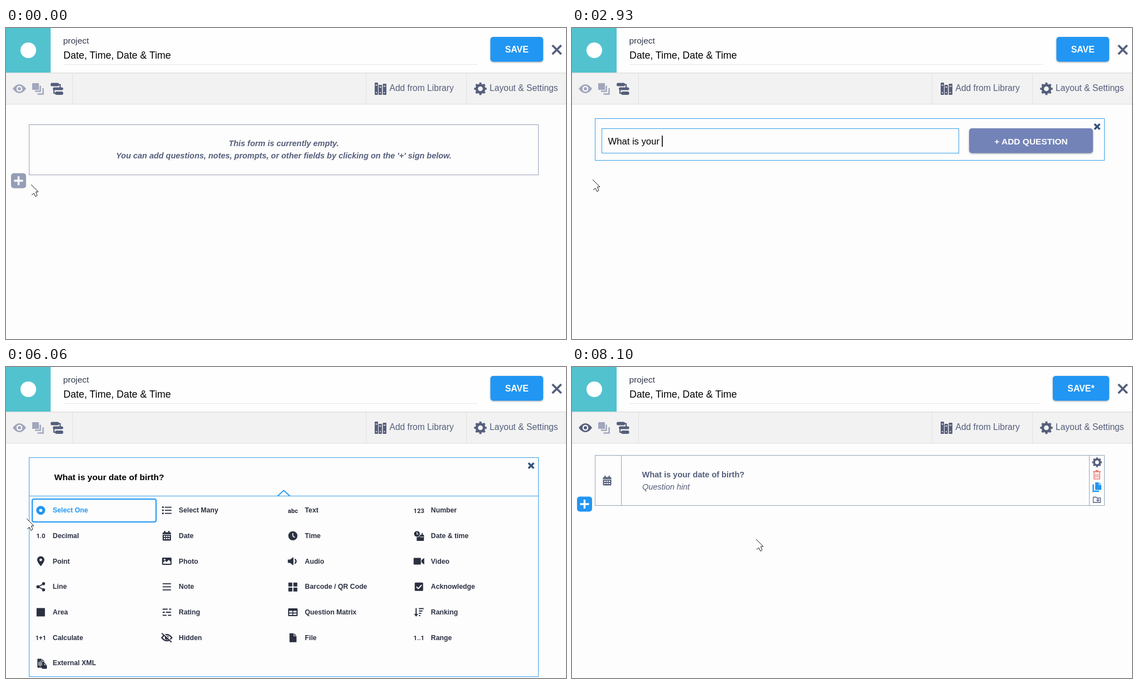
Recreate the animation shown at these times as an HTML page. Size 1004 by 558 pixels, loop 9.55 s.

```html
<!DOCTYPE html>
<html lang="en">
<head>
<meta charset="utf-8">
<title>Form builder</title>
<style>
  html, body { margin: 0; width: 100%; height: 100%; overflow: hidden; background: #fdfdfd; }
  svg { display: block; font-family: "Liberation Sans", Arial, sans-serif; }
  text { white-space: pre; }
  .navy { color: #555e7b; }
  .pale { color: #a1a6bb; }
  .blue { color: #2196f3; }
  .ink { color: #2b3040; }
  .icon, .label { fill: currentColor; }
  .line { fill: none; stroke: currentColor; }
  .hole { fill: #fdfdfd; }
  .cut { fill: none; stroke: #fdfdfd; }
  .bold { font-weight: bold; }
  .italic { font-style: italic; }
  .glyph { font: 700 11.3px Roboto, sans-serif; text-anchor: middle; }
  .raised { filter: drop-shadow(0 1px 1.5px #0005); }
</style>
</head>
<body>
<svg id="stage" width="1004" height="558" viewBox="0 0 1004 558"></svg>
<script>
const LOOP = 9550;
const QUESTION = "What is your date of birth?";
// One time per typed character.
const KEY_TIMES = [1080, 1280, 1380, 1480, 1610, 1810, 1910, 2010, 2410, 2540, 2670, 2800, 2930,
  3320, 3520, 3610, 3690, 3780, 3980, 4110, 4310, 4440, 4640, 4710, 4910, 5110, 5790];
const CARET_OFF = [[950, 1080], [5590, 5790]];

const at = (x, y, body, cls = "") => `<g transform="translate(${x} ${y})" class="${cls}">${body}</g>`;
const path = (d, cls = "icon", width = 1) => `<path d="${d}" class="${cls}" stroke-width="${width}"/>`;
const line = (d, width) => path(d, "line", width);
const cut = (d, width) => path(d, "cut", width);
const disc = (x, y, r, cls = "icon") => `<circle cx="${x}" cy="${y}" r="${r}" class="${cls}"/>`;
const box = (x, y, w, h, r = 0, cls = "icon") =>
  `<rect x="${x}" y="${y}" width="${w}" height="${h}" rx="${r}" class="${cls}"/>`;
const frame = (x, y, w, h, color, fill = "#fdfdfd") =>
  `<rect x="${x}" y="${y}" width="${w}" height="${h}" fill="${fill}" stroke="${color}"/>`;
const text = (x, y, size, words, cls = "", more = "") =>
  `<text x="${x}" y="${y}" font-size="${size}" class="label ${cls}" ${more}>${words}</text>`;
const centered = 'text-anchor="middle"';
const glyph = words => `<text y="4.5" class="icon glyph">${words}</text>`;
const cross = r => `M${-r} ${-r}L${r} ${r}M${r} ${-r}L${-r} ${r}`;

const gear = r => `<circle r="${r * .6}" class="line" stroke-width="${r * .42}"/>
  <circle r="${r * .87}" class="line" stroke-width="${r * .26}" pathLength="16"
    stroke-dasharray="1 1" stroke-dashoffset=".5"/>`;
const eye = path("M-12 0Q-6 -8 0 -8T12 0Q6 8 0 8T-12 0Z") + disc(0, 0, 5.2, "hole") + disc(0, 0, 3);
const plus = box(0, 0, 27, 27, 5) + cut("M5.5 13.5h16M13.5 5.5v16", 3.4);
const calendar = box(-7.5, -6.5, 15, 15, 1.5) + line("M-3.7 -9v4M3.7 -9v4", 2.2) +
  cut("M-7.5 -2.4h15", 1) + cut("M-5.3 1h2.6M-1.3 1h2.6M2.7 1h2.6M-5.3 5h2.6M-1.3 5h2.6M2.7 5h2.6", 2.2);
const sheet = path("M-6 -8H2L6.5 -3.5V8H-6Z") + cut("M1.8 -8V-3.3H6.5", 1);

const TYPES = [
  ["Select One", disc(0, 0, 8) + disc(0, 0, 2.8, "hole")],
  ["Select Many", line("M-8.5 -5.5h3M-8.5 0h3M-8.5 5.5h3", 2.8) + line("M-3.5 -5.5h12M-3.5 0h12M-3.5 5.5h12", 1.8)],
  ["Text", glyph("abc")],
  ["Number", glyph("123")],
  ["Decimal", glyph("1.0")],
  ["Date", calendar],
  ["Time", disc(0, 0, 8.2) + cut("M0 -5V.5L3.5 3", 1.6)],
  ["Date &amp; time", box(-4, -2, 13, 11, 1) + line("M6 -5v4", 2) + disc(-3.5, -3.5, 6.2, "hole") +
    disc(-3.5, -3.5, 5.2) + cut("M-3.5 -7v4h2.6", 1.2) + cut("M2 2h6", 1)],
  ["Point", path("M0 9Q-6.5 1 -6.5 -2.5A6.5 6.5 0 0 1 6.5 -2.5Q6.5 1 0 9Z") + disc(0, -2.5, 2.4, "hole")],
  ["Photo", box(-8.5, -6.5, 17, 13, 1.5) + path("M-6.5 4.5V2L-3 -1L-.5 1.5L3.5 -2.5L6.5 .5V4.5Z", "hole") +
    disc(-4, -3, 1.5, "hole")],
  ["Audio", path("M-9 -3H-5L1 -7.5V7.5L-5 3H-9Z") + line("M3.5 -4Q8 0 3.5 4", 2.4)],
  ["Video", box(-9.5, -6, 13, 12, 1) + path("M4.5 -2L9.5 -6V6L4.5 2Z")],
  ["Line", line("M6 -5.5L-5 0L6 5.5", 1.8) + disc(5, -5.5, 2.8) + disc(-5, 0, 2.9) + disc(5, 5.5, 2.8)],
  ["Note", line("M-7.5 -5.5h15M-7.5 0h15M-7.5 5.5h15", 1.8)],
  ["Barcode / QR Code", box(-8, -7.5, 7, 7) + box(1, -7.5, 7, 7) + box(-8, 1.5, 7, 7) + box(1, 1.5, 7, 7)],
  ["Acknowledge", box(-7.5, -7.5, 15, 15, 1.5) + cut("M-4.5 0L-1.2 3.3L4.8 -3", 2)],
  ["Area", box(-7.5, -7.5, 15, 15, .5)],
  ["Rating", line("M-7.5 -5.5h9M4 -5.5h4M-7.5 0h4M-1.5 0h9M-7.5 5.5h7M2 5.5h6", 1.8)],
  ["Question Matrix", box(-8.5, -7, 17, 14, 1.5) + cut("M-6.5 -1h5.7M.8 -1h5.7M-6.5 3.6h5.7M.8 3.6h5.7", 2.8)],
  ["Ranking", line("M-5 -7.5V6", 2) + path("M-8.8 3H-1.2L-5 8Z") + line("M0 -6.5h8.5M0 -2.3h6.5M0 1.9h4.5M0 6h2.5", 1.9)],
  ["Calculate", glyph("1+1")],
  ["Hidden", line("M-9 0Q0 -11 9 0Q0 11 -9 0Z", 2.2) + disc(0, 0, 3.5) + cut("M-8 -9L9 7", 2) + line("M-9 -8L8.5 8", 1.9)],
  ["File", sheet],
  ["Range", glyph("1..1")],
  ["External XML", sheet + cut("M-3.5 -2v6M-1 -4v10M1.5 -2v6", 1.2) + box(2, 3.5, 9, 6.5, 1) +
    line("M4.2 4V2Q6.5 -1 8.8 2V4", 1.4)],
];
const COL = 226, ROW = 45.7;

const header = `
  <rect y="80" width="1004" height="56" fill="#f2f2f2"/>
  <path d="M0 136.5H1004" stroke="#e3e3e3"/><path d="M0 137.5H1004" stroke="#f4f4f4"/>
  <rect width="1004" height="80" fill="#fefefe"/>
  <path d="M0 80.5H1004" stroke="#dedede"/><path d="M0 81.5H1004" stroke="#eaeaea"/>
  <path d="M119.5 82V136M645.5 82V136M825.5 82V136" stroke="#e2e2e2"/>
  <rect width="80" height="80" fill="#52c2cf"/>
  <circle cx="40" cy="40" r="14" fill="#fff"/>
  <g color="#333b4d">${text(102.5, 27.5, 15.4, "project")}</g>
  ${text(103, 55, 17.7, "Date, Time, Date &amp; Time")}
  <path id="underline" stroke="#e6e6e6"/>
  <rect id="save" y="16" height="44.5" rx="5" fill="#2196f3" class="raised"/>
  <text id="saveText" y="43.5" font-size="15.9" class="bold" fill="#fff" ${centered}></text>
  <g class="navy">
    ${at(987.5, 39, line(cross(8), 3.8))}
    <g id="preview">${at(24, 109, eye)}</g>
    ${at(47, 99, box(0, 0, 12, 12) + line("M14.5 4.5V14.5H5M19.5 9V19.5H9.5", 2.4), "pale")}
    ${box(80, 98.5, 15, 6, 2.5)}${box(84, 106.5, 18.5, 5, 2.5)}${box(88, 114, 14.5, 6, 2.5)}
    ${line("M93 101.5H97V109M86 109V117H90", 2.2)}
    ${box(661, 98, 6, 22, 1)}${box(668, 102, 6, 18, 1)}${box(675.5, 100, 6.5, 20, 1)}
    ${cut("M662.5 102.5h3M669.5 106h3M677 104.5h3.5M663 116h2M670 116h2M677.5 116h2", 1.6)}
    ${text(687.5, 113, 15.6, "Add from Library")}
    ${at(850.5, 109, gear(11.2))}
    ${text(867, 113, 15.65, "Layout &amp; Settings")}
  </g>`;

const emptyForm = `
  ${frame(41.5, 173.5, 913, 90, "#979fb9")}
  <g class="navy">
    ${text(498, 212, 14.45, "This form is currently empty.", "bold italic", centered)}
    ${text(498, 234, 14.45, "You can add questions, notes, prompts, or other fields by clicking on the '+' sign below.", "bold italic", centered)}
  </g>
  <g id="addFirst">${at(9, 260.5, plus)}</g>`;

const closeMark = at(941.5, 177, line(cross(4.8), 3.4), "close");

const questionInput = `
  ${frame(41.5, 162.5, 913, 75, "#3a9fe8")}
  ${frame(53.5, 180.5, 640, 44, "#3a9fe8")}
  <text id="typed" x="64.6" y="208.5" font-size="16.6"></text>
  <rect id="caret" y="193" width="1.6" height="20"/>
  <rect x="712" y="180" width="222" height="44.5" rx="5" fill="#7383b8" class="raised"/>
  <g color="#fff">${text(823, 208.5, 15.5, "+ ADD QUESTION", "bold", centered)}</g>
  <g color="#33527d">${closeMark}</g>`;

const typeMenu = `
  ${frame(41.5, 162.5, 913, 393, "#3a9fe8")}
  ${text(86.5, 203, 15.55, QUESTION, "bold")}
  <g color="#33527d">${closeMark}</g>
  <path d="M42 231.5H954" stroke="#3a9fe8"/>
  <path d="M487 231.5L498 221.5L509 231.5" fill="#fdfdfd" stroke="#2f9af0" stroke-width="2"/>
  <path d="M489 232H507" stroke="#fdfdfd" stroke-width="2"/>
  <path d="M42 231.5H954" stroke="#3a9fe8"/>
  <rect x="47" y="237" width="222" height="41" rx="3" fill="none" stroke="#2196f3" stroke-width="2"/>
  ${TYPES.map(([name, icon], i) => at(62.3 + i % 4 * COL, 257.2 + Math.floor(i / 4) * ROW,
    icon + text(21.5, 4, 12.25, name, "bold"), "type ink")).join("")}`;

const savedQuestion = `
  ${frame(41.5, 158.5, 913, 90, "#97a3bb")}
  <path d="M88.5 159V248M927.5 159V248" stroke="#97a3bb"/>
  <g class="navy">
    ${at(63, 204, calendar)}
    ${text(125.5, 198, 14.5, QUESTION, "bold")}
    ${text(126, 220, 14.45, "Question hint", "italic")}
    ${at(941.3, 171, gear(8.8))}
    ${at(941, 238, line("M-6.5 -4.5H-1.5L0 -3H6.5V5H-6.5ZM-1 1H5M2 -2V4", 1.3))}
  </g>
  <g color="#f37d74">${at(941, 193.5, line("M-7 -5.5H7M-2.5 -7.5H2.5", 2) +
    line("M-5 -4V7.5H5V-4M-1.7 -2V5M1.7 -2V5", 1.7))}</g>
  <g class="blue">
    ${at(941, 215.5, path("M-3 -8.5H4L8 -4.5V5H-3Z") + cut("M3.8 -8.5V-4.3H8", 1) + line("M-6.5 -5V7.5H4", 2.4))}
    ${at(9, 232.5, plus)}
  </g>`;

const pointer = `
  <circle id="click" r="13.5" fill="#fbe92f" opacity=".82"/>
  <path d="M0 0L13 13H8.5L10.8 19.5L8 21.5L5 15.5L1 18.5Z" fill="#fdfdfd"/>
  <path d="M0 0L13 13H8.5L10.8 19.5L8 21.5L5 15.5L1 18.5" fill="none" stroke="#1c1c28"/>`;

const scenes = { emptyForm, questionInput, typeMenu, savedQuestion };
document.getElementById("stage").innerHTML = header +
  Object.entries(scenes).map(([id, body]) => `<g id="${id}">${body}</g>`).join("") +
  `<g id="pointer">${pointer}</g>`;

const el = id => document.getElementById(id);
const show = (id, on) => el(id).setAttribute("visibility", on ? "inherit" : "hidden");
const set = (id, attrs) => Object.entries(attrs).forEach(([key, value]) => el(id).setAttribute(key, value));
const typeItems = [...document.querySelectorAll(".type")];
const between = (t, from, to) => t >= from && t < to;

function pointerAt(t) {
  if (t < 70) return [45, 281];
  if (t < 140) return [41, 276];
  if (t < 6860) return [37, 272];
  if (t >= 7780) return [330, 309];
  const p = Math.min(9, Math.floor((t - 6860) / 68.75) + 1) / 9;
  const eased = p * p * (3 - 2 * p);
  return [37 + 287 * eased, 272 + 45 * eased];
}

function render(t) {
  const scene = t < 410 ? "emptyForm" : t < 6060 ? "questionInput" : t < 7950 ? "typeMenu" : "savedQuestion";
  Object.keys(scenes).forEach(id => show(id, id === scene));

  const dirty = t >= 8100;
  const saveX = dirty ? 862 : 868.5;
  set("save", { x: saveX, width: 963 - saveX });
  set("saveText", { x: (saveX + 963) / 2 });
  el("saveText").textContent = dirty ? "SAVE*" : "SAVE";
  set("underline", { d: `M103 65.5H${dirty ? 839 : 845}` });
  set("preview", { class: dirty ? "navy" : "pale" });
  set("addFirst", { class: t < 70 ? "pale" : "blue", color: "" });
  if (t < 70) el("addFirst").style.color = "#969db6";
  else el("addFirst").style.color = "";

  el("typed").textContent = QUESTION.slice(0, KEY_TIMES.filter(time => time <= t).length);
  set("caret", { x: Math.floor(64.6 + el("typed").getComputedTextLength() - .3) });
  show("caret", scene === "questionInput" && !CARET_OFF.some(([from, to]) => between(t, from, to)));

  const [x, y] = pointerAt(t);
  set("pointer", { transform: `translate(${x} ${y})` });
  show("click", between(t, 340, 410) || between(t, 7860, 7950));

  const hovered = x < 46 ? -1 : Math.floor((y - 236) / ROW) * 4 + Math.floor((x - 46) / COL);
  typeItems.forEach((item, i) => item.setAttribute("class", `type ${i === 0 || i === hovered ? "blue" : "ink"}`));
}

let start;
function tick(now) {
  start ??= now;
  render((now - start) % LOOP);
  requestAnimationFrame(tick);
}
render(0);
requestAnimationFrame(tick);
</script>
</body>
</html>
```
